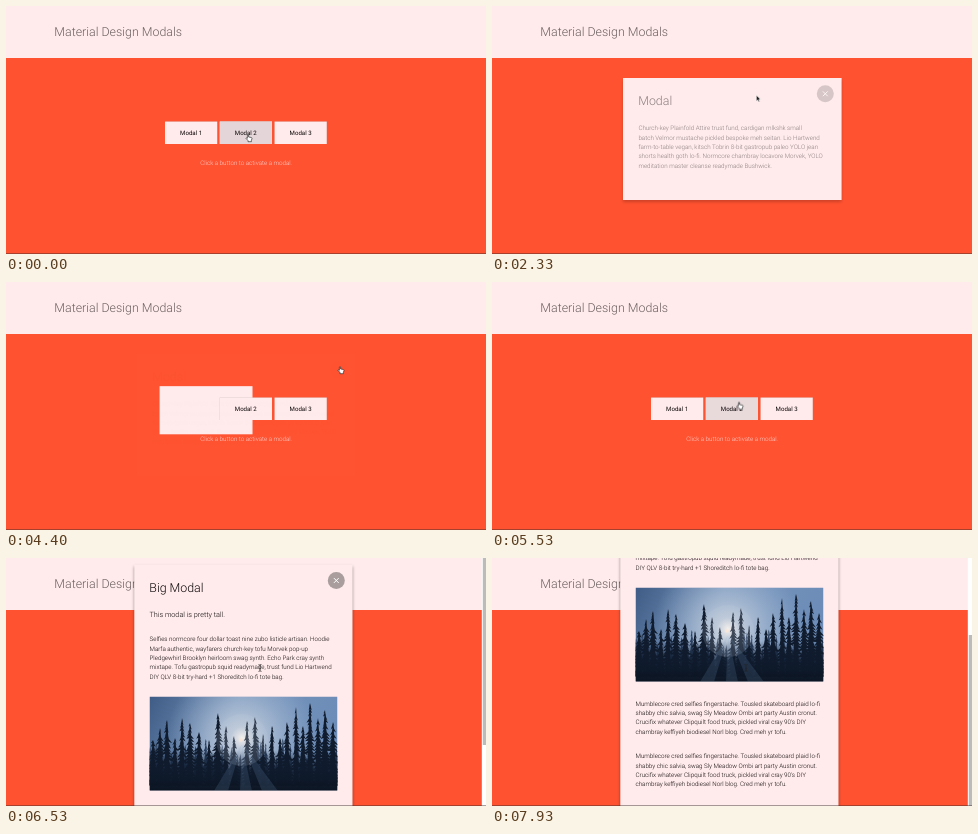
Write an HTML page that moves like this. It is 480 by 248 pixels and loops after 8 s.

```html
<!DOCTYPE html>
<html lang="en">
<head>
<meta charset="utf-8">
<title>Material Design Modals</title>
<style>
  html, body { margin: 0; width: 100%; height: 100%; overflow: hidden; background: #ff5230; }
  svg { display: block; width: 480px; height: 248px; }
  text { font: 300 6.23px Roboto, sans-serif; fill: #0c0607; text-rendering: geometricPrecision; white-space: pre; }
  .title { font-size: 12.4px; }
  .sub { font-size: 7.25px; }
  .label { font-size: 6.1px; font-weight: 400; text-anchor: middle; }
  .pink { fill: #ffebec; }
  .button { filter: drop-shadow(0 .7px .6px rgba(0, 0, 0, .25)); }
  .sheet { filter: drop-shadow(0 2.4px 1.8px rgba(0, 0, 0, .42)); }
</style>
</head>
<body>
<svg id="stage" viewBox="0 0 480 248">
  <defs>
    <linearGradient id="sky" x1="0" y1="0" x2="1" y2=".25">
      <stop offset="0" stop-color="#3f5c86"/>
      <stop offset=".45" stop-color="#7391b8"/>
      <stop offset="1" stop-color="#6d8db8"/>
    </linearGradient>
    <radialGradient id="sun" gradientUnits="userSpaceOnUse" cx="236" cy="180" r="75">
      <stop offset="0" stop-color="#f3efec"/>
      <stop offset=".15" stop-color="#c9d2de" stop-opacity=".85"/>
      <stop offset="1" stop-color="#a9bfda" stop-opacity="0"/>
    </radialGradient>
    <linearGradient id="ground" x1="0" y1="0" x2="0" y2="1">
      <stop offset="0" stop-color="#0f1b2d" stop-opacity="0"/>
      <stop offset=".5" stop-color="#0f1b2d" stop-opacity=".85"/>
      <stop offset="1" stop-color="#0a1320"/>
    </linearGradient>
    <clipPath id="photoClip"><rect x="143.5" y="138.5" width="188" height="94"/></clipPath>
  </defs>
</svg>
<script>
const LOOP = 8000;
const QUINT = 'cubic-bezier(.23,1,.32,1)';
const stage = document.getElementById('stage');

function add(parent, tag, attrs = {}, content = '') {
  const el = document.createElementNS('http://www.w3.org/2000/svg', tag);
  for (const key in attrs) el.setAttribute(key, attrs[key]);
  el.textContent = content;
  parent.append(el);
  return el;
}
const group = (parent, attrs) => add(parent, 'g', attrs);
const rect = (parent, x, y, width, height, attrs) => add(parent, 'rect', { x, y, width, height, ...attrs });
const text = (parent, x, y, content, attrs) => add(parent, 'text', { x, y, ...attrs }, content);
const lines = (parent, x, y, rows) => rows.forEach((row, i) => text(parent, x, y + i * 9.35, row));

// Each step is [time, value, easing towards the next step].
function animate(el, property, steps) {
  const first = steps[0], last = steps[steps.length - 1];
  const padded = [[0, first[1]], ...steps, [LOOP, last[1]]];
  el.animate(padded.map(([time, value, easing = 'linear']) =>
    ({ offset: time / LOOP, [property]: value, easing })), { duration: LOOP, iterations: Infinity });
}
const move = (el, steps) => animate(el, 'transform',
  steps.map(([time, x, y, easing]) => [time, `translate(${x}px,${y}px)`, easing]));
const morph = (el, steps) => animate(el, 'transform',
  steps.map(([time, x, y, w, h, easing]) => [time, `translate(${x}px,${y}px) scale(${w},${h})`, easing]));
const show = (el, ...spans) => animate(el, 'opacity',
  [[0, 0, 'step-end'], ...spans.flatMap(([from, to]) => [[from, 1, 'step-end'], [to, 0, 'step-end']])]);
const fade = (el, steps) => animate(el, 'opacity', steps);

// Page
rect(stage, 0, 0, 480, 248, { fill: '#ff5230' });
rect(stage, 0, 0, 480, 52, { class: 'pink' });
text(stage, 48.3, 30.2, 'Material Design Modals', { class: 'title', style: 'fill:#6b5f60' });

function button(x, label, hovers) {
  const g = group(stage, { class: 'button' });
  rect(g, x, 115.5, 52.3, 22.5, { class: 'pink' });
  const tint = rect(g, x, 115.5, 52.3, 22.5, { fill: '#e4d6d8' });
  text(g, x + 26.1, 129, label, { class: 'label' });
  fade(tint, hovers.flatMap(([from, to]) =>
    [[from, from ? 0 : 1], [from + 60, 1], [to, 1], [to + 80, 0]]));
}
const sheet = () => rect(stage, 0, 0, 1, 1, { class: 'pink' });

button(159, 'Modal 1', [[560, 700], [1000, 1840]]);
const closing = sheet();
button(213.7, 'Modal 2', [[0, 170], [400, 500], [760, 830], [5480, 5840]]);
button(268.5, 'Modal 3', [[200, 350]]);
text(stage, 240.2, 159.2, 'Click a button to activate a modal.',
  { style: 'text-anchor:middle;fill:#ffebec;opacity:.85' });

show(closing, [4283, 4800]);
morph(closing, [
  [4283, 131, 72, 218.5, 122, 'cubic-bezier(.36,.49,.64,.8)'],
  [4400, 153.5, 104, 93.5, 48.5, 'cubic-bezier(.19,1,.44,1)'],
  [4783, 159, 115.5, 52.3, 22.5]]);

const opening = sheet();
show(opening, [1837, 4283]);
morph(opening, [
  [1837, 159, 115.5, 52.3, 22.5],
  [1870, 158, 104, 97, 50.3, QUINT],
  [2337, 131, 72, 218.5, 122]]);

const openingTall = sheet();
show(openingTall, [5834, 6500]);
morph(openingTall, [
  [5834, 213.7, 115.5, 52.3, 22.5, QUINT],
  [6334, 131, 6.5, 218, 363]]);

function closeButton(parent, x, y) {
  add(parent, 'circle', { cx: x, cy: y, r: 8.5, fill: '#aa9d9e' });
  add(parent, 'path', { d: `M${x - 2.4} ${y - 2.4}l4.8 4.8m0-4.8l-4.8 4.8`, stroke: '#fff', 'stroke-width': 1 });
}

// Small modal
const modal = group(stage);
rect(modal, 131, 72, 218.5, 122, { class: 'pink sheet' });
closeButton(modal, 333.3, 87.8);
text(modal, 146.2, 99.2, 'Modal', { class: 'title' });
lines(modal, 146.4, 124.2, [
  'Church-key Plainfold Attire trust fund, cardigan mlkshk small',
  'batch Velmor mustache pickled bespoke meh seitan. Lio Hartwend',
  'farm-to-table vegan, kitsch Tobrin 8-bit gastropub paleo YOLO jean',
  'shorts health goth lo-fi. Normcore chambray locavore Morvek, YOLO',
  'meditation master cleanse readymade Bushwick.']);
fade(modal, [[2234, 0, 'ease-out'], [2540, 1], [4275, 1, 'ease-out'], [4410, 0]]);

// Tall modal
const tall = group(stage);
const page = group(tall);
rect(page, 128.3, 6.5, 218.2, 363, { class: 'pink sheet' });
closeButton(page, 330.3, 22.5);
text(page, 143.3, 33.8, 'Big Modal', { class: 'title' });
text(page, 143.5, 59.4, 'This modal is pretty tall.', { class: 'sub' });
lines(page, 143.5, 83.2, [
  'Selfies normcore four dollar toast nine zubo listicle artisan. Hoodie',
  'Marfa authentic, wayfarers church-key tofu Morvek pop-up',
  'Pledgewhirl Brooklyn heirloom swag synth. Echo Park cray synth',
  'mixtape. Tofu gastropub squid readymade, trust fund Lio Hartwend',
  'DIY QLV 8-bit try-hard +1 Shoreditch lo-fi tote bag.']);
for (const y of [256.7, 309.2]) lines(page, 143.5, y, [
  'Mumblecore cred selfies fingerstache. Tousled skateboard plaid lo-fi',
  'shabby chic salvia, swag Sly Meadow Ombi art party Austin cronut.',
  "Crucifix whatever Clipquilt food truck, pickled viral cray 90's DIY",
  'chambray keffiyeh biodiesel Norl blog. Cred meh yr tofu.']);

// Forest picture
let seed = 11;
const random = () => (seed = (seed * 16807) % 2147483647) / 2147483647;
const photo = group(page, { 'clip-path': 'url(#photoClip)' });
rect(photo, 143.5, 138.5, 188, 94, { fill: 'url(#sky)' });
rect(photo, 143.5, 138.5, 188, 94, { fill: 'url(#sun)' });

// A spruce: a thin spire with ragged, drooping branches of random reach.
function tree(x, top, spread, fill) {
  const base = 228, tiers = Math.round((base - top) / 3.2);
  const left = [], right = [];
  for (let i = 1; i <= tiers; i++) {
    const y = top + (base - top) * i / tiers;
    const reach = spread * Math.min(1, .12 + 1.2 * i / tiers);
    const branch = () => reach * (.35 + .85 * random());
    left.push(`${x - branch()} ${y + 1.5 * random()}`, `${x - reach * .3} ${y - .6}`);
    right.unshift(`${x + reach * .3} ${y - .6}`, `${x + branch()} ${y + 1.5 * random()}`);
  }
  add(photo, 'path', { d: `M${x} ${top}L${left.join('L')}L${right.join('L')}Z`, fill });
}
for (let x = 144; x < 334; x += 5) tree(x + 3 * random(), 180 + 20 * random(), 5, '#2b4060');
const tallTrees = [[147, 182], [154, 170], [161, 162], [169, 180], [176, 160], [184, 165], [193, 174], [203, 182],
  [212, 155], [220, 168], [228, 178], [241, 163], [249, 159], [257, 176], [266, 168], [274, 180], [281, 164],
  [290, 149], [297, 168], [304, 145], [312, 160], [319, 152], [327, 164]];
tallTrees.forEach(([x, top]) => tree(x, top, 6 + 3 * random(), '#101c2e'));
rect(photo, 143.5, 192, 188, 41, { fill: 'url(#ground)' });
add(photo, 'circle', { cx: 236, cy: 182, r: 26, fill: 'url(#sun)', opacity: .25 });
add(photo, 'path', { d: 'M236 186L208 233H222ZM236 186L234 233H246ZM237 186L256 233H272Z', fill: '#7f9fca', opacity: .16 });
add(photo, 'circle', { cx: 235, cy: 182, r: 1.8, fill: '#fbe6d6', opacity: .85 });

fade(tall, [[6234, 0, 'ease-out'], [6500, 1]]);
move(page, [
  [6770, 0, 0, 'cubic-bezier(.35,.3,.4,1)'], [7600, 0, -95], [7740, 0, -95, 'ease-out'], [7930, 0, -109]]);

// Scroll bar
const bar = group(stage);
rect(bar, 475.8, 0, 4.2, 248, { fill: '#fff' });
const thumb = rect(bar, 0, 0, 1, 1, { fill: '#bdbaba' });
show(bar, [5900, LOOP]);
morph(thumb, [
  [5900, 476.8, 0, 3.2, 225, 'ease-out'], [6070, 476.8, 0, 3.2, 196, 'ease-out'],
  [6400, 476.8, 0, 3.2, 187], [6770, 476.8, 0, 3.2, 187, 'cubic-bezier(.35,.3,.4,1)'],
  [7600, 476.8, 67, 3.2, 173], [7740, 476.8, 67, 3.2, 173, 'ease-out'], [7930, 476.8, 77, 3.2, 171]]);
rect(stage, 0, 247.2, 480, .8, { fill: '#3a2a2a', opacity: .55 });

// Pointer
const pointer = group(stage);
const outline = { fill: '#fff', stroke: '#222', 'stroke-width': .65, 'stroke-linejoin': 'round' };
const hand = add(pointer, 'path', { ...outline,
  d: 'M-1.6 .3V-3.1Q-1-4-.4-3.1V-1L2.4-.5Q3.1-.2 3 .6L2.4 2.3V3.7H-1V2.6L-3 .3Q-2.8-.7-1.6 .3Z' });
const arrow = add(pointer, 'path', { fill: '#111', stroke: '#fff', 'stroke-width': .45,
  d: 'M-.6-2.6V3.2L.8 2L1.7 4.1L2.6 3.7L1.7 1.6H3.4Z' });
const beam = add(pointer, 'path', { fill: 'none', stroke: '#222', 'stroke-width': .7,
  d: 'M-1.5-3.4Q0-3.4 0-2.6Q0-3.4 1.5-3.4M0-2.6V2.6M-1.5 3.4Q0 3.4 0 2.6Q0 3.4 1.5 3.4M-.8 .9H.8' });
show(hand, [0, 1960], [3850, 4520], [5480, 6220]);
show(arrow, [1960, 3850], [4520, 5480]);
show(beam, [6220, LOOP]);
move(pointer, [
  [70, 243, 132, 'ease-in-out'], [300, 293, 134, 'ease-in-out'], [450, 243, 134], [640, 182, 132, 'ease-in-out'],
  [870, 240, 151], [930, 230, 153, 'ease-out'], [1070, 176, 130],
  [1960, 176, 130, 'ease-in-out'], [2640, 330, 64, 'ease-out'], [3200, 328, 62],
  [3440, 328, 62, 'ease-in-out'], [3950, 335, 88],
  [5030, 335, 88, 'ease-in-out'], [5650, 241, 126.5],
  [6100, 241, 126.5, 'ease-in-out'], [6450, 254, 110]]);
</script>
</body>
</html>
```
